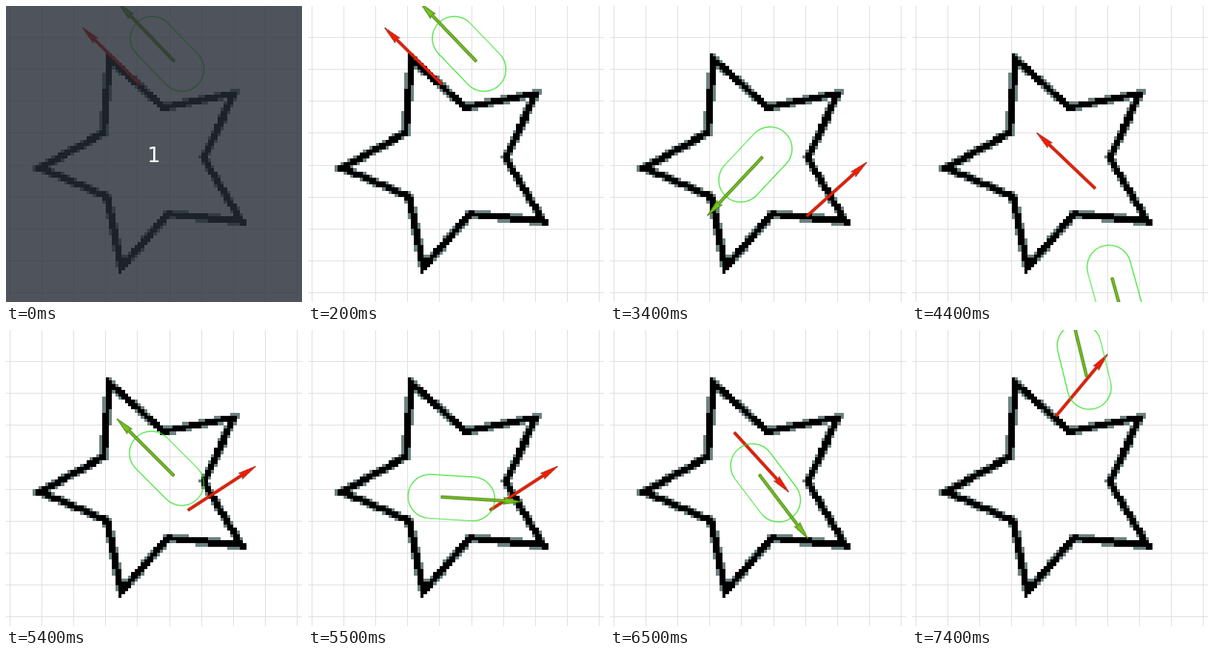
An HTML page with a canvas that plays this animation: 400 by 400 pixels, repeating every 8000 ms.

```html
<!DOCTYPE html>
<html lang="en">
<head>
<meta charset="utf-8">
<title>Star map</title>
<style>
  html, body { margin: 0; width: 100%; height: 100%; overflow: hidden; background: #fff; }
  canvas, svg { position: absolute; left: 0; top: 0; width: 100vw; height: 100vh; }
  .red, .green, .veil { animation: 8s step-end infinite; }
  .red { animation-name: red; }
  .green { animation-name: green; }
  .veil { animation-name: veil; }
  .arrow { stroke-width: 1; }
  .red .arrow { fill: #f41c00; stroke: #a01c0c; }
  .green .arrow { fill: #74c41c; stroke: #42760e; }
  .hull { fill: none; stroke: #2fdf22; stroke-width: 1.15; }
  .veil text { font: 28px "DejaVu Sans", sans-serif; fill: #fff; text-anchor: middle; }

  /* red turns 100 ms ahead of green */
  @keyframes red {
    0%    { transform: translate(181px, 106px) rotate(224.7deg); }
    30%   { transform: translate(271px, 230px) rotate(190.7deg); }
    42.5% { transform: translate(266px, 284px) rotate(-42deg); }
    55%   { transform: translate(247.5px, 246.5px) rotate(223.6deg); }
    67.5% { transform: translate(246px, 243.5px) rotate(-33deg); }
    80%   { transform: translate(168px, 138.5px) rotate(47.6deg); }
    92.5%, 100% { transform: translate(194.5px, 116.5px) rotate(-50.2deg); }
  }
  @keyframes green {
    0%     { transform: translate(217.7px, 64.7px) rotate(226.2deg); }
    30%    { transform: translate(196.5px, 214.2px) rotate(133.2deg); }
    43.75% { transform: translate(274px, 380.8px) rotate(74.5deg); }
    56.25% { transform: translate(217px, 187px) rotate(225deg); }
    68.75% { transform: translate(193.8px, 226.5px) rotate(3.5deg); }
    81.25% { transform: translate(210.2px, 206.6px) rotate(52.8deg); }
    92.5%, 100% { transform: translate(232.7px, 49.3px) rotate(256.3deg); }
  }
  @keyframes veil {
    0% { visibility: visible; }
    2.5%, 100% { visibility: hidden; }
  }
</style>
</head>
<body>
<canvas id="map" width="400" height="400"></canvas>
<svg viewBox="0 0 400 400">
  <defs>
    <path id="arrow" d="M0-1.7H87L84.5-4.5 109 0 84.5 4.5 87 1.7H0z"/>
  </defs>
  <g class="red"><use class="arrow" href="#arrow"/></g>
  <g class="green">
    <rect class="hull" x="-58.7" y="-29.7" width="117.4" height="59.4" rx="29.7"/>
    <use class="arrow" href="#arrow" x="-14"/>
  </g>
  <g class="veil">
    <rect width="400" height="400" fill="#252a34" fill-opacity=".804"/>
    <text x="200" y="211">1</text>
  </g>
</svg>
<script>
  const ctx = document.getElementById('map').getContext('2d');
  const STEP = 43.15, CELL = STEP / 10, SIZE = 92;
  const X0 = 5.3, Y0 = 42.5 - STEP;
  const star = [
    [140, 72], [213, 137], [308, 118], [267.5, 206], [318, 291],
    [219, 281], [156, 353], [137, 258], [46, 219], [132, 171]
  ];

  ctx.fillStyle = '#dedede';
  for (let i = 0; i < 10; i++) {
    ctx.fillRect(Math.floor(X0 + i * STEP), 0, 1, 400);
    ctx.fillRect(0, Math.floor(Y0 + (i + 1) * STEP), 400, 1);
  }

  // stroke the star at one pixel per cell, then enlarge it in two tones
  const small = document.createElement('canvas');
  small.width = small.height = SIZE;
  const pen = small.getContext('2d');
  pen.lineWidth = 2;
  star.forEach(([x, y]) => pen.lineTo((x - X0) / CELL, (y - Y0) / CELL));
  pen.closePath();
  pen.stroke();

  const { data } = pen.getImageData(0, 0, SIZE, SIZE);
  for (let j = 0; j < SIZE; j++) {
    for (let i = 0; i < SIZE; i++) {
      const cover = data[(j * SIZE + i) * 4 + 3] / 255;
      if (cover < .12) continue;
      ctx.fillStyle = cover < .55 ? '#6c827f' : '#000';
      const l = Math.round(X0 + i * CELL), t = Math.round(Y0 + j * CELL);
      const r = Math.round(X0 + (i + 1) * CELL), b = Math.round(Y0 + (j + 1) * CELL);
      ctx.fillRect(l, t, r - l, b - t);
    }
  }
</script>
</body>
</html>
```
